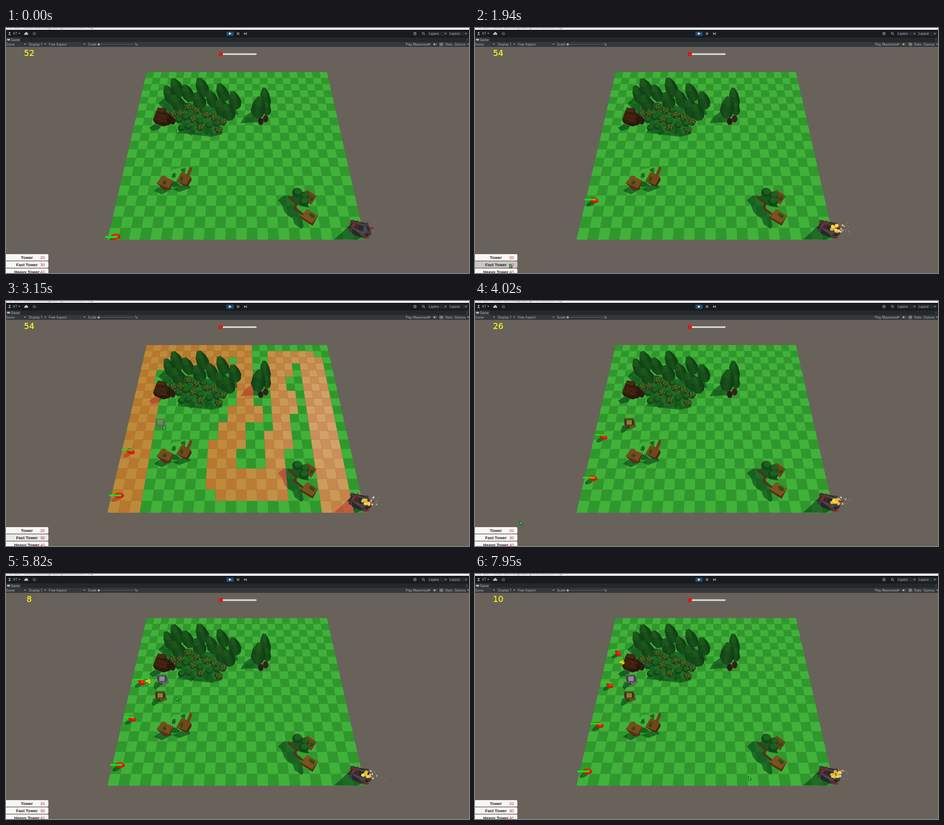
Recreate the animation shown at these times as an HTML page with a canvas. Size 1027 by 545 pixels, loop 8 s.

```html
<!DOCTYPE html>
<html lang="en">
<head>
<meta charset="utf-8">
<title>Tower defence</title>
<style>
html, body { margin: 0; height: 100%; overflow: hidden; background: #68625b; }
canvas { display: block; }
</style>
</head>
<body>
<canvas id="stage" width="1027" height="545"></canvas>
<script>
const ctx = document.getElementById('stage').getContext('2d');
const COLS = 24, ROWS = 20, LOOP = 8;
const rand = n => { const s = Math.sin(n * 127.1 + 3.7) * 43758.5453; return s - Math.floor(s); };

// ---------- drawing helpers ----------
function shape(d, fill, stroke, width = 1) {
  const p = new Path2D(d);
  if (fill) { ctx.fillStyle = fill; ctx.fill(p); }
  if (stroke) { ctx.strokeStyle = stroke; ctx.lineWidth = width; ctx.stroke(p); }
}
function rect(x, y, w, h, fill, r = 0) {
  ctx.fillStyle = fill;
  ctx.beginPath();
  ctx.roundRect(x, y, w, h, r);
  ctx.fill();
}
function oval(x, y, rx, ry, fill, angle = 0) {
  ctx.fillStyle = fill;
  ctx.beginPath();
  ctx.ellipse(x, y, rx, ry, angle, 0, 7);
  ctx.fill();
}
function label(s, x, y, font, fill, align = 'left') {
  ctx.font = font;
  ctx.fillStyle = fill;
  ctx.textAlign = align;
  ctx.fillText(s, x, y);
}

// ---------- board ----------
const TOP = 98, BOTTOM = 471;
const depth = y => (y - TOP) / (BOTTOM - TOP);
const leftEdge = y => 312 - 87 * depth(y);
const rightEdge = y => 712 + 84 * depth(y);
const widthAt = y => rightEdge(y) - leftEdge(y);
// Perspective: the inverse of the row width is linear in depth.
function rowY(r) {
  const u = r / ROWS, w = 1 / ((1 - u) / 401 + u / 575);
  return TOP + (w - 401) / 174 * (BOTTOM - TOP);
}
function project(c, r) {
  const y = rowY(r);
  return [leftEdge(y) + c / COLS * widthAt(y), y];
}
function blockPath(c, r, w = 1, h = 1) {
  return 'M' + [project(c, r), project(c + w, r), project(c + w, r + h), project(c, r + h)].join('L') + 'Z';
}
// Free blocks: column, row, width, height
const freeBlocks = [
  [14,0,10,1], [14,1,2,8], [22,1,2,1], [23,2,1,18], [11,2,1,1], [2,4,1,2], [3,4,9,5],
  [3,9,8,2], [3,11,7,2], [3,13,6,5], [3,18,7,1], [3,19,17,1], [15,9,1,2], [13,11,3,1],
  [13,12,2,2], [12,14,3,2], [19,3,1,2], [18,5,2,2], [19,7,1,3], [18,10,2,4], [17,14,3,5]];
const cells = [];
for (let r = 0; r < ROWS; r++) for (let c = 0; c < COLS; c++) {
  const light = (c + r) % 2, [x, y] = project(c + 0.5, r + 0.5);
  const free = freeBlocks.some(([a, b, w, h]) => c >= a && c < a + w && r >= b && r < b + h);
  const shine = Math.exp(-(((x - 725) / 150) ** 2) - ((y - 270) / 220) ** 2);
  const base = light ? [190, 138, 57] : [184, 119, 46];
  const road = `rgb(${base.map((v, i) => Math.round(v + shine * [22, 25, 50][i]))})`;
  cells.push({ d: blockPath(c, r), green: light ? '#40b239' : '#2f982c', road, free });
}
const boardArea = new Path2D(blockPath(0, 0, COLS, ROWS));
const roadArea = new Path2D();
cells.forEach(k => k.free || roadArea.addPath(new Path2D(k.d)));

const shadowPaths = [
  'M338 168L352 155L420 170L510 180L515 192L470 205L480 236L455 242L380 233L390 215L350 180Z',
  'M317 222L332 212L346 216L339 225L325 229Z',
  'M520 212L530 196L548 184L565 196L562 210L545 210Z',
  'M328 362L343 352L372 358L400 345L410 355L384 365L368 358L346 370Z',
  'M603 383L616 373L628 372L644 396L656 420L660 442L655 447L640 436L636 424L624 416L617 408L612 393Z',
  'M728 470L744 456L760 440L790 465L778 471Z'];
function drawShadows(t, fill) {
  shadowPaths.forEach(d => shape(d, fill));
  enemies(t).forEach(({ x, y, s }) => oval(x - 8 * s, y + 8 * s, 11 * s, 5 * s, fill, -0.5));
  towers(t).forEach(({ x, y }) => shape(`M${x - 20} ${y + 17}l4-12l8 0l4 9l-12 8Z`, fill));
}
function clipped(area, paint) {
  ctx.save();
  ctx.clip(area);
  paint();
  ctx.restore();
}
function drawBoard(t, placing) {
  cells.forEach(k => shape(k.d, k.green));
  clipped(boardArea, () => drawShadows(t, 'rgba(8,62,24,.6)'));
  if (placing) clipped(roadArea, () => {
    cells.forEach(k => k.free || shape(k.d, k.road, 'rgba(190,90,50,.18)', 0.6));
    drawShadows(t, 'rgba(180,48,48,.55)');
  });
}

// ---------- scenery ----------
function tree([x, y, w, h, lean]) {
  const g = ctx.createLinearGradient(-w, 0, w, 0);
  g.addColorStop(0, '#114016');
  g.addColorStop(0.5, '#18521b');
  g.addColorStop(1, '#0e3912');
  ctx.save();
  ctx.translate(x, y);
  ctx.rotate(lean);
  shape(`M${-w * .3} ${-h}L${w * .3} ${-h * .95}L${w * .8} ${-h * .4}L${w} ${h * .25}L${w * .75} ${h * .75}
    L${w * .2} ${h}L${-w * .5} ${h * .9}L${-w} ${h * .35}L${-w * .85} ${-h * .4}Z`, g);
  shape(`M${-w * .3} ${-h}L${w * .3} ${-h * .95}L${w * .3} ${-h * .1}L${-w * .85} ${-h * .3}Z`, 'rgba(48,110,32,.25)');
  ctx.restore();
}
function bush(x, y, r, berries) {
  oval(x, y, r, r * .95, '#134619');
  oval(x + r * .15, y - r * .25, r * .75, r * .6, '#205f1f');
  for (let i = 0; i < berries; i++) {
    const a = i * 2.4 + x, d = r * Math.sqrt((i + .5) / berries);
    oval(x + Math.cos(a) * d, y + Math.sin(a) * d * .85, 1.2, 1.2, '#de4422');
  }
}
function tuft(x, y, n = 5, size = 5) {
  for (let i = 0; i < n; i++) {
    const px = x + (rand(i + x) - .5) * size * 2, py = y + (rand(i * 3 + y) - .5) * size * 1.6;
    shape(`M${px - 3} ${py - 2}L${px} ${py + 3}L${px + 3} ${py - 3}M${px} ${py + 4}V${py - 4}`, null, '#15521a', 1.1);
  }
}
const backTrees = [
  [379,133,14,23,-.4], [403,145,13,21,-.35], [435,132,14,23,-.35], [480,143,13,22,-.4],
  [363,149,13,23,-.4], [457,158,13,21,-.35], [428,161,15,20,-.4], [381,167,15,21,-.5],
  [507,161,14,21,-.25], [479,178,16,22,-.4], [493,187,15,20,-.3]];
const berryBushes = [[404,176], [422,184], [370,191], [386,190], [444,193], [462,199], [414,203], [481,209], [431,221], [472,227]];
const plainBushes = [[438,183], [398,198], [383,204], [430,208], [467,212], [450,216], [404,219], [389,222]];

function drawScenery() {
  backTrees.forEach(tree);
  plainBushes.forEach(([x, y]) => bush(x, y, 8, 0));
  berryBushes.forEach(([x, y]) => bush(x, y, 9, 7));
  tuft(413, 232, 8, 6);
  tuft(450, 232, 9, 8);

  // crates and stump
  oval(370, 207, 6, 8, '#2b1a16');
  shape('M326 204L334 184L357 187L370 199L364 215L349 219L330 211Z', '#2c170b');
  shape('M326 204L334 186L359 190L354 211Z', '#40240f');
  shape('M333 186L337 177L354 179L357 190L350 195Z', '#341c0e');
  shape('M335 185L338 178L354 180L351 189Z', '#482a15');
  for (let i = 0; i < 24; i++)
    rect(329 + rand(i) * 32, 189 + rand(i + 50) * 22, 3, 1.5, i % 2 ? '#55311a' : '#241208');

  // tree pair with trunks
  oval(565, 208, 6, 8, '#2d1c18');
  oval(576, 202, 6, 8, '#382019');
  tree([575,157,12,25,-.1]);
  tree([579,180,9,15,0]);
  tree([560,177,16,25,.15]);

  // garden plots, lower left
  shape('M362 340L378 342L388 352L372 354L364 350Z', '#17601f');
  shape('M334 345L348 328L372 337L365 358L352 362Z', '#573015');
  shape('M334 345L348 328L372 337L361 356Z', '#7b4a1e');
  shape('M376 340L388 318L410 331L412 338L403 353L396 351Z', '#4a2913');
  shape('M376 340L388 318L410 331L400 349Z', '#784519');
  shape('M400 328L408 308L413 311L412 317L405 331Z', '#6d4019');
  shape('M408 308H428', null, '#267d24');
  shape('M355 332L370 314L385 312L404 318L388 322L377 342Z', '#40b239');
  [[351,343], [372,329], [392,316], [389,335]].forEach(([x, y]) => tuft(x, y, 4, 4));

  // garden plots, lower right
  shape('M628 374L650 370L672 396L668 414L646 399Z', '#145a1d');
  shape('M643 392L654 396L674 400L668 406L660 416L646 402Z', '#35a332');
  shape('M626 375L645 391L640 400L660 416', null, '#57301a', 5);
  shape('M655 371L669 360L689 374L677 393L671 389Z', '#754319');
  shape('M652 422L668 403L692 418L680 440Z', '#53300f');
  shape('M655 420L668 403L692 418L679 434Z', '#80501f');
  tuft(678, 379, 4, 4);
  tuft(678, 418, 5, 5);
  [[646,366,11], [663,373,10], [661,386,11]].forEach(([x, y, r]) => bush(x, y, r, 0));
}
function drawFortress() {
  shape('M758 445L770 428L803 435L810 459L794 468L770 459Z', '#26272a');
  shape('M764 443L773 431L799 437L803 455L789 461Z', '#47474b');
  shape('M771 444L777 435L794 441L791 453Z', '#28292d');
  for (const [x, y] of [[768,431], [800,437], [764,449], [793,463], [806,455]]) rect(x - 4, y - 4, 8, 8, '#3b3c41', 1);
  shape('M763 433L777 437L769 444L762 441M776 431L781 440L777 449M783 455L790 463', null, '#821b20', 2);
  shape('M804 442L818 445L806 449ZM795 462L808 466L797 469ZM780 427L784 433L776 432Z', '#8f1f25');
}
function drawTower({ x, y, dark, side, top }) {
  shape(`M${x - 12} ${y - 10}L${x + 8} ${y - 11}L${x + 14} ${y + 7}L${x - 2} ${y + 13}L${x - 11} ${y + 6}Z`, dark);
  shape(`M${x + 8} ${y - 7}L${x + 14} ${y + 8}L${x} ${y + 13}L${x - 1} ${y + 6}L${x + 7} ${y + 4}Z`, side);
  rect(x - 11, y - 9, 20, 15, dark);
  for (let i = 0; i < 4; i++) {
    rect(x - 11 + i * 5.5, y - 12, 3.6, 4, side);
    rect(x - 12 + i * 5.5, y + 4, 3.6, 3, side);
  }
  rect(x - 7, y - 7, 12, 10, top);
}

// ---------- game state ----------
const PLACED_FAST = 3.5, PLACED_BASIC = 5.3;
const placingAt = t => (t > 2.2 && t < PLACED_FAST) || (t > 4.4 && t < PLACED_BASIC);
const fastTower = { x: 343, y: 272, dark: '#35301a', side: '#5e5424', top: '#8e7c2a' };
const basicTower = { x: 347, y: 235, dark: '#3d4142', side: '#64686a', top: '#8b8e90' };
const towers = t => [t > PLACED_BASIC && basicTower, t > PLACED_FAST && fastTower].filter(Boolean);

function moneyAt(t) {
  const income = 2 * Math.max(0, Math.floor((t - 1.8) / 1.975) + 1);
  return 52 + income - (t > PLACED_FAST ? 30 : 0) - (t > PLACED_BASIC ? 20 : 0);
}
function enemies(t) {
  return [0.14, 2.48, 4.98, 7.42].filter(start => t > start - .15).map(start => {
    const y = rowY(19.735 - 1.824 * Math.max(0, t - start)) + .3;
    return { x: 243 + (464 - y) * .257, y, s: widthAt(y) / 567 };
  });
}
function drawEnemy({ x, y, s }) {
  const up = 464 - y, tilt = (55 - (y - 176) * .21) * Math.PI / 180;
  oval(x, y, 11 * s, 6.4 * s, '#e01010', tilt);
  oval(x + 1, y - 1.5 * s, 7 * s, 3 * s, '#f52a20', tilt);
  rect(x - 23 + up * .027, y - 1.5 - up * .026, 27 * s, 4.4 * s * s, '#12e512');
}
function drawShot(t) {
  const flight = ((t - 5.69) % 1.065) / .2;
  if (t < 5.69 || flight > 1) return;
  const e = enemies(t)[0], x = 347 + (e.x - 347) * flight, y = 231 + (e.y - 231) * flight;
  for (let i = 0; i < 6; i++)
    oval(x + (rand(i) - .5) * 9, y + (rand(i + 9) - .5) * 8, 2.3, 2.1, i % 2 ? '#ffd91a' : '#e8b90c');
}
function drawSmoke(t) {
  for (let i = 0; i < 22; i++) {
    const age = t - .35 - i * .055;
    if (age < 0) continue;
    const a = age % 1.2, seed = i + 31 * Math.floor(age / 1.2), spread = rand(seed) - .5;
    const x = 791 + a * (26 + 18 * rand(seed + 7)), y = 446 + spread * (9 + 14 * a);
    if (a < .45) oval(x, y, 3.8, 3.4, i % 3 ? '#e6b626' : '#f4d850');
    else if (a < .8) oval(x, y, 2, 2, i % 3 ? '#d3cab8' : '#b0a084');
    else oval(x, y, 1, 1, 'rgba(190,178,155,.5)');
  }
}
const cursorKeys = [
  [0,378,225], [.3,330,270], [.8,88,504], [1.3,48,521], [1.68,40,520], [1.94,76,525], [2.25,72,523],
  [2.6,232,390], [3.15,348,277], [3.55,346,275], [4.15,66,518], [4.3,60,508], [4.45,66,507],
  [4.89,310,274], [5.15,350,236], [5.4,351,238], [5.82,377,273], [6.3,372,295], [6.75,360,322],
  [7.2,400,360], [7.95,606,450], [8,606,450]];
function cursorAt(t) {
  const i = cursorKeys.findIndex(k => k[0] > t);
  const [t0, x0, y0] = cursorKeys[i - 1], [t1, x1, y1] = cursorKeys[i];
  const u = (t - t0) / (t1 - t0), e = u * u * (3 - 2 * u);
  return [x0 + (x1 - x0) * e, y0 + (y1 - y0) * e];
}

// ---------- interface ----------
function drawEditor() {
  const grey = '#b9bcbd', ui = '7px Inter, sans-serif';
  const text = (s, x, y) => label(s, x, y, ui, grey);
  const arrow = (x, y) => shape(`M${x - 2} ${y - 1}h4l-2 2.5Z`, grey);
  rect(0, 0, 1027, 4, '#f7f8f8');
  [['File', 1], ['Edit', 18], ['Assets', 37], ['GameObject', 63], ['Component', 105], ['Window', 147], ['Help', 178]]
    .forEach(([s, x]) => label(s, x, 1.2, '8px "Liberation Sans", sans-serif', '#444'));
  rect(0, 4, 1027, 17, '#171b1d');
  rect(0, 21, 1027, 10, '#25282a');
  rect(0, 21, 33, 10, '#34383a');
  rect(0, 31, 1027, 11, '#34383a');

  oval(8, 10.5, 1.7, 1.7, grey);
  shape('M5 15.5Q8 10.5 11 15.5Z', grey);
  text('KT', 16, 15);
  arrow(29.5, 12);
  oval(42.5, 13.5, 2.3, 2.1, grey); oval(45, 12, 2.8, 3, grey); oval(47.3, 13.6, 2, 2, grey);
  shape('M60 12.5a3 3 0 1 0 6 0a3 3 0 1 0-6 0M62 12.5a1 1 0 1 0 2 0a1 1 0 1 0-2 0', null, '#62676a', 1.2);
  rect(489, 8, 16, 9.5, '#204c73', 1);
  shape('M494.5 9.5L500.5 12.5L494.5 15.5Z', '#e8eef2');
  rect(512.5, 9.8, 1.5, 5.5, grey);
  rect(515.5, 9.8, 1.5, 5.5, grey);
  shape('M528.5 9.8L532.5 12.5L528.5 15.2Z', grey);
  rect(533, 9.8, 1.2, 5.4, grey);
  shape('M904 12.5a3 3 0 1 0 6 0a3 3 0 1 0-6 0M907 10.5v2.2h1.6', null, grey, 1);
  shape('M923 11.8a2.4 2.4 0 1 0 4.8 0a2.4 2.4 0 1 0-4.8 0M927.2 13.6l2.6 2.4', null, grey, 1);
  rect(936, 8, 43, 9.5, '#25292b', 1);
  rect(982, 8, 43, 9.5, '#25292b', 1);
  text('Layers', 938, 15); arrow(975, 12.5);
  text('Layout', 984, 15); arrow(1020, 12.5);

  rect(2, 24, 7, 4, grey, 2);
  text('Game', 11, 28.7);
  [24, 26, 28].forEach(y => rect(1022, y - .5, 1, 1, grey));
  text('Game', 0, 39); arrow(42, 36);
  text('Display 1', 51, 39); arrow(87, 36);
  text('Free Aspect', 95, 39); arrow(174, 36);
  text('Scale', 182, 39);
  rect(205, 36, 79, 1, '#5d6163');
  oval(205.5, 36.5, 2.5, 2.5, '#a2a5a6');
  text('1x', 286, 39);
  text('Play Maximized', 887, 39); arrow(940, 36);
  shape('M948 35h1.7l2-2v6.5l-2-2h-1.7Z', grey);
  shape('M953.7 34q2 2.3 0 4.5', null, grey, .8);
  shape('M962 33.5h7v5.5h-7ZM962 36.2h7M964.4 33.5v5.5M966.7 33.5v5.5', null, grey, .7);
  text('Stats', 974, 39);
  text('Gizmos', 995, 39); arrow(1025, 36);
}
function drawHud(t, [cx, cy]) {
  label(moneyAt(t), 51.5, 62.3, '18px "DejaVu Sans", sans-serif', '#fdf21c', 'center');
  ctx.strokeStyle = '#fdf21c';
  ctx.lineWidth = .4;
  ctx.strokeText(moneyAt(t), 51.5, 62.3);
  rect(476, 56.2, 80, 3.8, '#d9d7d4', 2);
  oval(476.3, 58, 5, 5, '#d91b14');
  ['Tower', 'Fast Tower', 'Heavy Tower'].forEach((name, i) => {
    const y = 503 + 16 * i, over = cx < 94 && cy >= y && cy < y + 15;
    const chosen = placingAt(t) && i === (t < 4 ? 1 : 0);
    rect(-4, y, 98, 14.5, over ? '#c9c8c7' : chosen ? '#ebeae9' : '#f7f6f5', 2.5);
    label(name, 46.3, y + 11, 'bold 9.2px "Liberation Sans", sans-serif', '#24211f', 'center');
    label(20 + 10 * i, 81, y + 11, '9.2px "Liberation Sans", sans-serif', '#c22a2a', 'center');
  });
}
function drawCursor([x, y]) {
  shape(`M${x} ${y}l.8 9l2-2l2 3.2l1.6-1l-1.8-3l2.8-.6Z`, '#2fd84a', '#0c3a14', .9);
}

function draw(t) {
  const cursor = cursorAt(t), placing = placingAt(t);
  rect(0, 0, 1027, 545, '#68625b');
  drawEditor();
  drawBoard(t, placing);
  drawScenery();
  towers(t).forEach(drawTower);
  const ghost = t > 3 && t < PLACED_FAST ? fastTower : t > 5.08 && t < PLACED_BASIC ? basicTower : null;
  if (ghost) {
    ctx.globalAlpha = .45;
    drawTower({ ...ghost, dark: '#4c6a4c', side: '#5f7d5e', top: '#8aa088' });
    ctx.globalAlpha = 1;
  }
  enemies(t).forEach(drawEnemy);
  drawShot(t);
  drawFortress();
  drawSmoke(t);
  drawHud(t, cursor);
  drawCursor(cursor);
}
const begin = performance.now();
function frame() {
  draw(((performance.now() - begin) / 1000) % LOOP);
  requestAnimationFrame(frame);
}
frame();
</script>
</body>
</html>
```
